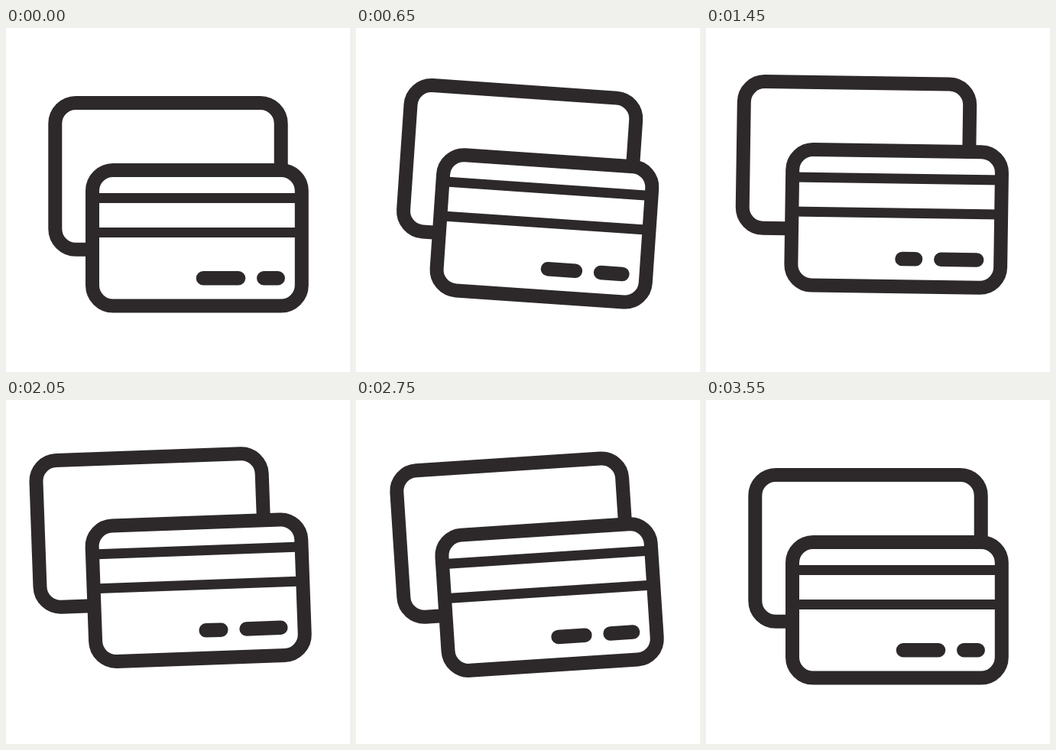
An HTML page with a canvas for the animation above (3.6 s loop, 450x450 px).

```html
<!DOCTYPE html>
<html lang="en">
<head>
<meta charset="utf-8">
<title>Bank cards</title>
<style>
  html, body { margin: 0; width: 100%; height: 100%; overflow: hidden; background: #fff; }
  canvas { display: block; width: 450px; height: 450px; }
</style>
</head>
<body>
<canvas id="stage" width="450" height="450"></canvas>
<script>
const ctx = document.getElementById('stage').getContext('2d');
const LOOP = 3600, STEP = 50, END = 3550, CENTER = 225;
const INK = '#2d292a', PAPER = '#fff';

// Sine bump from 0 to 1 and back; a higher power rounds its feet.
function bump(t, start, peak, end, power) {
  if (t <= start || t >= end) return 0;
  const u = t < peak ? (t - start) / (peak - start) : (end - t) / (end - peak);
  return Math.sin(Math.PI / 2 * u) ** power;
}

// Tilt in degrees: swing right, sweep over to the left, settle back.
function tilt(t) {
  const right = 4.25, left = -3.9, tRight = 520, tLeft = 2640;
  if (t < tRight) return right * (1 - (1 - t / tRight) ** 1.5);
  if (t < tLeft) {
    const u = (t - tRight) / (tLeft - tRight);
    return right + (left - right) * (u - 0.056 * Math.sin(2 * Math.PI * u));
  }
  const u = Math.min((t - tLeft) / (END - tLeft), 1);
  return left * (1 - u ** 1.5);
}

function card(x, y, w, h) {
  ctx.beginPath();
  ctx.roundRect(x, y, w, h, 27);
  ctx.fill();
  ctx.lineWidth = 18;
  ctx.stroke();
}

function line(x1, x2, y, width, cap) {
  ctx.lineCap = cap;
  ctx.lineWidth = width;
  ctx.beginPath();
  ctx.moveTo(x1, y);
  ctx.lineTo(x2, y);
  ctx.stroke();
}

function draw(t) {
  const lift = 26.3 * bump(t, 0, 1650, END, 1.15);
  const slide = 22.2 * bump(t, 650, 1890, 3130, 2);
  const split = 29.5 * bump(t, 0, 1650, END, 2);

  ctx.setTransform(1, 0, 0, 1, 0, 0);
  ctx.fillStyle = PAPER;
  ctx.strokeStyle = INK;
  ctx.fillRect(0, 0, 450, 450);

  ctx.translate(CENTER, CENTER - lift);
  ctx.rotate(tilt(t) * Math.PI / 180);
  ctx.translate(-CENTER, -CENTER);

  card(64.3 - slide, 98, 295.4, 191.8);
  card(113, 186, 273.8, 177.6);
  line(113, 386, 222.5, 13, 'butt');
  line(113, 386, 267.5, 13, 'butt');
  line(258, 304 - split, 327.3, 18.5, 'round');
  line(337.3 - split, 355.7, 327.3, 18.5, 'round');
}

function tick(now) {
  draw(Math.floor((now % LOOP) / STEP) * STEP);
  requestAnimationFrame(tick);
}
draw(0);
requestAnimationFrame(tick);
</script>
</body>
</html>
```
